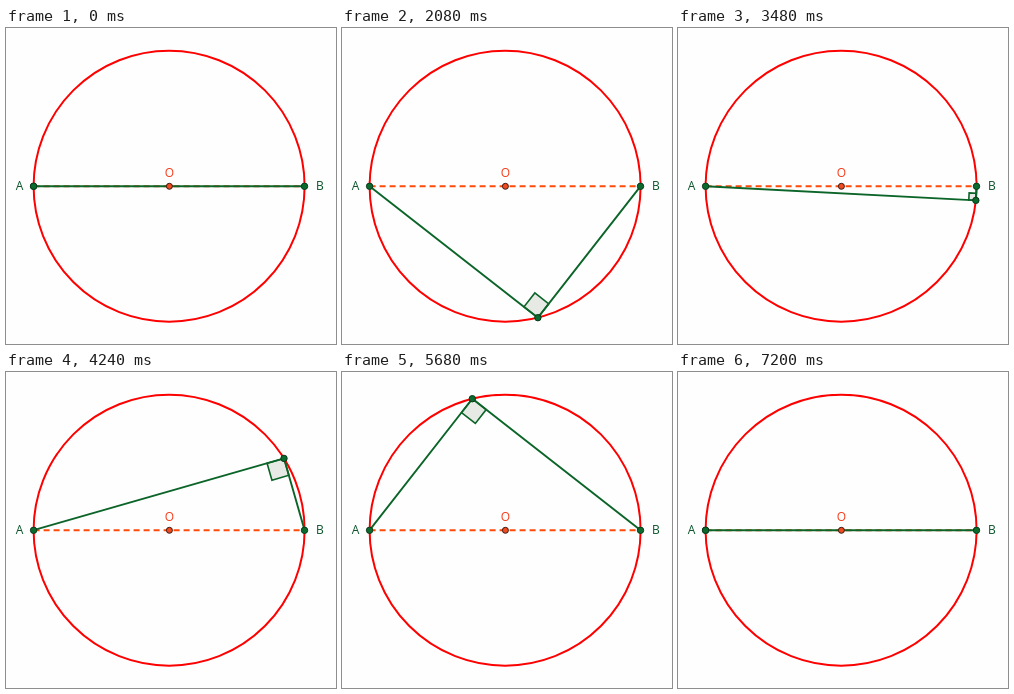
An HTML page that plays this animation: 330x316 px, repeating every 7240 ms.

```html
<!DOCTYPE html>
<html lang="en">
<head>
<meta charset="utf-8">
<title>Angle in a semicircle</title>
<style>
  html, body { margin: 0; width: 100%; height: 100%; overflow: hidden; background: #fefefe; }
  svg { display: block; width: 330px; height: 316px; }
  text { font: 12px "Open Sans", "Noto Sans", sans-serif; text-anchor: middle; fill: #0a5528; }
  .circle { fill: none; stroke: #f00; stroke-width: 2; }
  .diameter { stroke: #ff4a0a; stroke-width: 2; stroke-dasharray: 6 4; }
  .legs { fill: none; stroke: #0b6428; stroke-width: 1.9; stroke-linejoin: round; }
  .corner { fill: rgba(30, 60, 0, .1); stroke: #0b6428; stroke-width: 1.6; }
  .dot { fill: #0b6a2e; stroke: #0a3a1a; stroke-width: 1; }
  .center { fill: #f04a1e; stroke: #3a1a10; }
  .red { fill: #f5401e; }
</style>
</head>
<body>
<svg viewBox="0 0 330 316">
  <circle class="circle" cx="163.1" cy="158.2" r="135.5"/>
  <path class="diameter" d="M27.6 158.2H298.6"/>
  <path class="corner" id="corner"/>
  <path class="legs" id="legs"/>
  <circle class="dot center" cx="163.4" cy="158.3" r="3"/>
  <circle class="dot" cx="27.6" cy="158.3" r="3.2"/>
  <circle class="dot" cx="298.5" cy="158.3" r="3.2"/>
  <circle class="dot" id="apex" r="3.2"/>
  <text x="13.6" y="162">A</text>
  <text x="314" y="162">B</text>
  <text class="red" x="163.5" y="149">O</text>
</svg>
<script>
const STEP = 40, STEPS = 181, R = 135.5, CX = 163.1, CY = 158.2, SIDE = 17.6;
const A = [CX - R, CY], B = [CX + R, CY];
const [corner, legs, apex] = ["corner", "legs", "apex"].map(id => document.getElementById(id));
const path = points => "M" + points.map(p => p.map(v => v.toFixed(2)).join(" ")).join("L");

// Vector of the given length from p towards q
function towards(p, q, length) {
  const dx = q[0] - p[0], dy = q[1] - p[1], d = Math.hypot(dx, dy) || 1;
  return [dx / d * length, dy / d * length];
}
const add = (p, v) => [p[0] + v[0], p[1] + v[1]];
const dist = (p, q) => Math.hypot(p[0] - q[0], p[1] - q[1]);

function draw(now) {
  // Two degrees per step, counter-clockwise from A
  const angle = Math.floor(now / STEP) % STEPS * Math.PI / 90;
  const P = [CX - R * Math.cos(angle), CY + R * Math.sin(angle)];
  const side = Math.min(SIDE, dist(P, A) / 2, dist(P, B) / 2);
  const u = towards(P, A, side), v = towards(P, B, side);

  legs.setAttribute("d", path([A, P, B]));
  corner.setAttribute("d", side > 0.1 ? path([P, add(P, u), add(add(P, u), v), add(P, v)]) + "Z" : "");
  apex.setAttribute("cx", P[0]);
  apex.setAttribute("cy", P[1]);
}

const start = performance.now();
function tick() {
  draw(performance.now() - start);
  requestAnimationFrame(tick);
}
tick();
</script>
</body>
</html>
```
